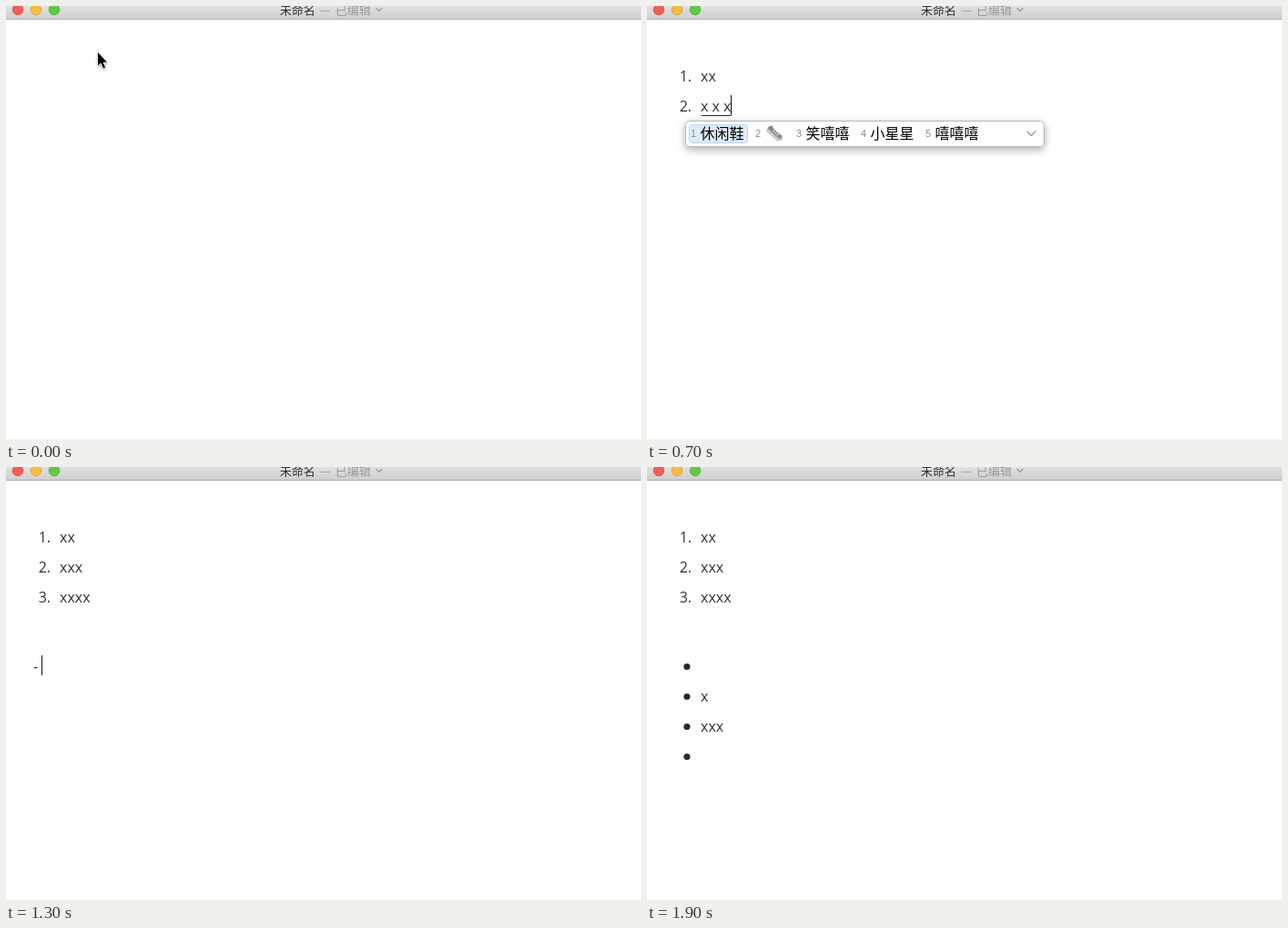
These frames come from a looping animation (698 px wide and 476 px high, 2 s). An HTML page:

```html
<!DOCTYPE html>
<html lang="zh-CN">
<head>
<meta charset="utf-8">
<title>列表输入</title>
<style>
  html, body { margin: 0; width: 100%; height: 100%; overflow: hidden; background: #fff; }
  svg { display: block; width: 698px; height: 476px; }
  text { white-space: pre; }
  .doc { font: 16px "Open Sans", sans-serif; fill: #333; }
  .title, .word { font-family: "Noto Sans CJK SC", "Noto Sans CJK", sans-serif; }
  .title { font-size: 13px; }
  .word { font-size: 16px; fill: #000; }
  .num { font: 11px "Liberation Sans", sans-serif; fill: #888; }
  .chevron { fill: none; stroke: #a2a2a2; stroke-width: 1.5; stroke-linecap: round; stroke-linejoin: round; }
  .panel { fill: #fff; stroke: #b8b8b8; filter: drop-shadow(0 3px 5px rgba(0, 0, 0, .32)); }
  .pick { fill: #deebfa; stroke: #bdd5ef; }
</style>
</head>
<body>
<svg viewBox="0 0 698 476">
  <defs>
    <linearGradient id="bar" x2="0" y2="1">
      <stop stop-color="#e0e0e0"/><stop offset="1" stop-color="#d0d0d0"/>
    </linearGradient>
  </defs>
  <rect width="698" height="14" fill="url(#bar)"/>
  <rect y="14" width="698" height="1" fill="#adadad"/>
  <g stroke-width=".8">
    <circle cx="13" cy="4" r="5.8" fill="#ed6058" stroke="#d2493f"/>
    <circle cx="33" cy="4" r="5.8" fill="#f6be41" stroke="#d9a033"/>
    <circle cx="53" cy="4" r="5.8" fill="#62c846" stroke="#4bad32"/>
  </g>
  <g class="title">
    <text x="301" y="9" fill="#303030">未命名</text>
    <text x="345" y="9" fill="#999">—</text>
    <text x="362" y="9" fill="#999">已编辑</text>
  </g>
  <path class="chevron" d="M407 2.5l3 3 3-3"/>
  <g id="page"></g>
</svg>
<script>
const page = document.getElementById('page');
const STEP = 100, LOOP = 2000;
const MARGIN = 30, ITEM = 59, LETTER = 8.37, SPACE = 4.16;
const ordered = [83, 116, 149, 182];
const bulleted = [225, 258, 291, 324];
const SHOE = 'shoe';

const words = {
  x: [...'写像想行小先型血下'],
  xx: ['谢谢', '信息', '学习', '休息', '学校', '小心'],
  xxx: ['休闲鞋', SHOE, '笑嘻嘻', '小星星', '嘻嘻嘻'],
  xxxx: ['嘻嘻嘻嘻', '欣欣向荣', '想象一下']
};

const text = (x, y, s, cls = 'doc') => `<text class="${cls}" x="${x}" y="${y}">${s}</text>`;
const caret = (x, y) => `<rect x="${x}" y="${y - 18}" width="1" height="22" fill="#111"/>`;

const numbers = (...items) => items.map((s, i) =>
  text(35.7, ordered[i], `${i + 1}.`) + text(ITEM, ordered[i], s)).join('');

const bullets = (...items) => items.map((s, i) =>
  `<circle cx="43.9" cy="${bulleted[i] - 5.5}" r="3.6" fill="#2b2b2b"/>` +
  text(ITEM, bulleted[i], s)).join('');

const shoe = (x, y) => `<g transform="translate(${x} ${y})">
  <path d="M2 3l5-3 3 5 8 6 1 4-3 2-11-8z" fill="#8b8b8b"/>
  <path d="M2 3l-1 4 13 11 5-2v-2l-4 1z" fill="#c9c9c9"/>
  <path d="M8 7l4-2M10 9l4-2M12 11l4-2" stroke="#e4e4e4"/></g>`;

function panel(left, y, list) {
  const top = y + 10;
  const width = w => w === SHOE ? 22 : w.length * 16;
  let x = left + 6, out =
    `<rect class="panel" x="${left + .5}" y="${top + .5}" width="394" height="28" rx="4"/>
     <rect class="pick" x="${left + 4.5}" y="${top + 4.5}" width="${width(list[0]) + 16}" height="20" rx="3"/>
     <path class="chevron" d="M${left + 376} ${top + 12}l4.5 4.5 4.5-4.5"/>`;
  list.forEach((w, i) => {
    out += text(x, top + 18, i + 1, 'num');
    out += w === SHOE ? shoe(x + 11, top + 5) : text(x + 10.5, top + 20, w, 'word');
    x += width(w) + 23;
  });
  return out;
}

// Letters still held by the input method, with underline and candidates.
function compose(x, y, letters) {
  const end = x + letters.length * LETTER + (letters.length - 1) * SPACE;
  return text(x, y, [...letters].join(' ')) +
    `<rect x="${x + .5}" y="${y + 4}" width="${end - x - .5}" height="1" fill="#333"/>` +
    caret(Math.floor(end), y) + panel(x - 17, y, words[letters]);
}

const pointer = `<path d="M101 51v14.5l3.3-3 2.6 6 2.3-1-2.6-5.8h4.4z" stroke="#fff" stroke-width="1.6"
  paint-order="stroke" style="filter:drop-shadow(0 1px 1px rgba(0,0,0,.4))"/>`;
const full = numbers('xx', 'xxx', 'xxxx');
const [n1, n2, n3, n4] = ordered, [b1, b2, b3, b4] = bulleted;

const scenes = [
  [0, pointer],
  [1, text(MARGIN, n1, '1.') + caret(43, n1)],
  [2, text(MARGIN, n1, '1.') + caret(47, n1)],
  [3, text(MARGIN, n1, '1.') + compose(47, n1, 'x')],
  [4, text(MARGIN, n1, '1.') + compose(47, n1, 'xx')],
  [5, numbers('xx', '')],
  [7, numbers('xx', '') + compose(ITEM, n2, 'xxx')],
  [8, numbers('xx', 'xxx', '') + caret(59, n3)],
  [9, numbers('xx', 'xxx', '') + compose(ITEM, n3, 'xxxx')],
  [10, full + caret(93, n3)],
  [11, numbers('xx', 'xxx', 'xxxx', '') + caret(59, n4)],
  [12, full + caret(MARGIN, b1)],
  [13, full + text(MARGIN, b1, '-') + caret(39, b1)],
  [14, full + bullets('', '') + caret(59, b2)],
  [15, full + bullets('', '') + compose(ITEM, b2, 'x')],
  [16, full + bullets('', 'x', '') + caret(59, b3)],
  [17, full + bullets('', 'x', '') + compose(ITEM, b3, 'xxx')],
  [18, full + bullets('', 'x', 'xxx', '') + caret(59, b4)],
  [19, full + bullets('', 'x', 'xxx', '')]
];

const start = performance.now();
let shown;
function draw() {
  const step = Math.floor((performance.now() - start) % LOOP / STEP);
  const scene = scenes.findLast(([from]) => from <= step);
  if (scene !== shown) page.innerHTML = (shown = scene)[1];
  requestAnimationFrame(draw);
}
draw();
</script>
</body>
</html>
```
